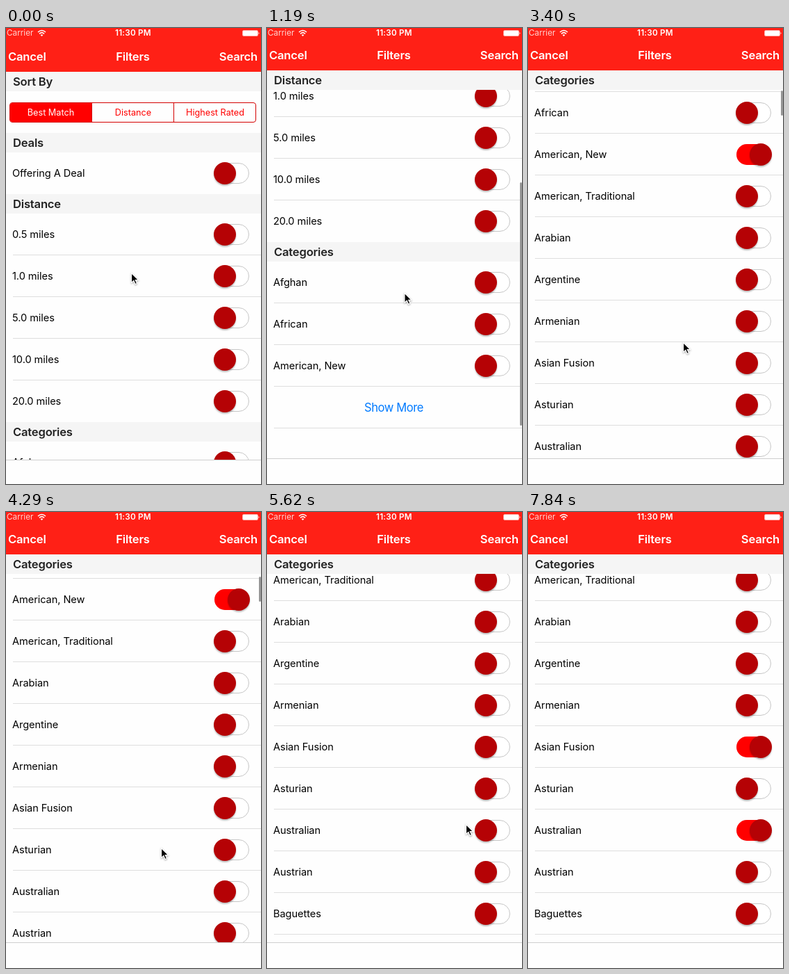
These frames come from a looping animation (367 by 656 pixels, 7990 ms). An HTML page:

```html
<!DOCTYPE html>
<html lang="en">
<head>
<meta charset="utf-8">
<title>Filters</title>
<style>
html, body { margin: 0; width: 100%; height: 100%; overflow: hidden; background: #fefefe; }
body { position: relative; font: 14.6px Inter, "Liberation Sans", sans-serif; color: #000; white-space: nowrap; }
div, span, svg { position: absolute; box-sizing: border-box; }
#nav { left: 0; top: 0; width: 367px; background: #ff2016; color: #fff; }
#status span { top: 0; font-size: 11.75px; line-height: 15px; }
#title { left: 0; width: 367px; height: 26px; font-size: 16.6px; font-weight: 600; line-height: 26px; letter-spacing: -.2px; }
#view { left: 0; width: 367px; height: 558px; overflow: hidden; }
#list { left: 0; top: 0; width: 367px; }
.head { left: 0; width: 367px; height: 28px; padding-left: 10px; background: #f5f5f5; color: #222; font-size: 16.6px; font-weight: 600; line-height: 29px; letter-spacing: -.2px; }
.row { left: 0; width: 367px; height: 60px; padding-left: 9px; line-height: 60px; letter-spacing: -.07px; }
.line::after { content: ""; position: absolute; left: 10px; right: 0; bottom: 0; height: 1px; background: #dedede; }
.more { padding: 0 2px 0 0; text-align: center; color: #007aff; font-size: 16.6px; letter-spacing: -.45px; }
.track, .fill { left: 300px; top: 15px; width: 50px; height: 30px; border-radius: 15px; }
.track { border: 1px solid #c6c6c6; background: #fff; }
.fill { background: #f00; opacity: 0; }
.knob { left: 299px; top: 14px; width: 32px; height: 32px; border-radius: 50%; background: #b50205; box-shadow: 0 2px 2px rgba(0,0,0,.25); }
#seg { left: 5px; top: 44px; width: 355px; height: 29px; border: 1px solid #d40000; border-radius: 4px; overflow: hidden; }
#seg div { top: 0; width: 119px; height: 27px; line-height: 27px; text-align: center; font-size: 12.7px; color: #f00; }
#seg div + div { border-left: 1px solid #d40000; }
#seg .on { background: #f00; color: #fff; }
#bar { left: 364px; width: 3px; border-radius: 1.5px; background: #969696; }
#foot { left: 0; width: 367px; height: 40px; border-top: 1px solid #cfcfcf; background: #fefefe; }
#cursor { left: -1px; top: -1px; filter: drop-shadow(0 1px 1px rgba(0,0,0,.35)); }
</style>
</head>
<body>
<div id="view"><div id="list"></div></div>
<div id="bar"></div>
<div id="foot"></div>
<div id="nav">
  <div id="status">
    <span style="left:1px;color:#ffd2cf">Carrier</span>
    <svg style="left:45px;top:2px" width="13" height="11" fill="none" stroke="#fff" stroke-width="1.6">
      <path d="M1 4Q6.5-1 12 4M3 6.3Q6.5 3 10 6.3"/><path d="M6.5 10L4.6 8Q6.5 6.4 8.4 8Z" fill="#fff" stroke="none"/>
    </svg>
    <span style="left:157px;font-weight:600;letter-spacing:.2px">11:30 PM</span>
    <svg style="left:339px;top:2px" width="27" height="11" fill="#fff">
      <rect x="1.5" y="1.5" width="22" height="8" rx="1.5" fill="none" stroke="#fff" opacity=".6"/>
      <rect x="2" y="2" width="21" height="7" rx="1"/><path d="M24.5 4Q26.5 5.5 24.5 7Z"/>
    </svg>
  </div>
  <div id="title">
    <span style="left:3px">Cancel</span>
    <span style="left:0;width:365px;text-align:center">Filters</span>
    <span style="right:5px">Search</span>
  </div>
</div>
<svg id="cursor" width="15" height="21">
  <path d="M1.5 1.5V15.5L4.8 12.5L7 17.6L9.5 16.5L7.3 11.6H11.6Z" fill="#000" stroke="#fff" stroke-width="1.2"/>
</svg>
<script>
const $ = id => document.getElementById(id);
const LOOP = 7990, STEP = 148, EXPAND = 2500;
const TAPS = { 'American, New': 1600, 'Australian': 6160, 'Asian Fusion': 7640 };

// Pointer moves: start, duration, goal x, goal y.
const MOVES = [
  [150, 590, 194, 378],
  [1150, 350, 325, 482],
  [1640, 430, 194, 534],
  [2500, 900, 223, 452],
  [3600, 690, 223, 483],
  [4292, 700, 220, 453],
  [5200, 420, 286, 449],
  [5650, 270, 322, 452],
  [6230, 130, 310, -30],
  [6530, 130, 300, 92],
  [6660, 300, 250, 180],
  [6960, 700, 322, 337]
];

const ramp = (t, start, time) => Math.max(0, Math.min(1, (t - start) / time));
const smooth = v => v * v * (3 - 2 * v);
const glide = (t, start, time) => 1 - (1 - ramp(t, start, time)) ** 3;

// Flick past the end, bounce back, then two flicks through the longer list.
const scrollAt = t => Math.round(289 * glide(t, 150, 700) - 32 * glide(t, 700, 600)
  + 304 * glide(t, 2650, 750) + 144 * glide(t, 4162, 858));

function pointerAt(t) {
  let x = 180, y = 352;
  for (const [start, time, toX, toY] of MOVES) {
    const p = smooth(ramp(t, start, time));
    x += (toX - x) * p;
    y += (toY - y) * p;
  }
  return [x, y];
}

function add(parent, cls, text = '', top = 0) {
  const el = document.createElement('div');
  el.className = cls;
  el.textContent = text;
  if (top) el.style.top = top + 'px';
  parent.append(el);
  return el;
}

const list = $('list'), heads = [], switches = [], extra = [];
let y = 0;

function section(name) {
  heads.push({ name, y });
  y += 28;
}

function option(name, line) {
  const row = add(list, line ? 'row line' : 'row', name, y);
  add(row, 'track');
  const fill = add(row, 'fill'), knob = add(row, 'knob');
  if (TAPS[name]) switches.push({ fill, knob, tap: TAPS[name] });
  y += 60;
  return row;
}

section('Sort By');
const seg = add(list, '');
seg.id = 'seg';
['Best Match', 'Distance', 'Highest Rated'].forEach((name, i) => {
  add(seg, i ? '' : 'on', name).style.left = i * 118 - 1 + 'px';
});
y += 60;
section('Deals');
option('Offering A Deal');
section('Distance');
['0.5', '1.0', '5.0', '10.0', '20.0'].forEach((d, i) => option(d + ' miles', i < 4));
section('Categories');
['Afghan', 'African', 'American, New'].forEach(n => option(n, true));
const more = add(list, 'row line more', 'Show More', y);
for (const n of ['American, Traditional', 'Arabian', 'Argentine', 'Armenian', 'Asian Fusion', 'Asturian',
  'Australian', 'Austrian', 'Baguettes', 'Bangladeshi']) extra.push(option(n, true));
for (const h of heads) h.el = add(list, 'head', h.name);

function draw(t) {
  const top = t < STEP ? 63 : 61, s = scrollAt(t), open = t >= EXPAND;
  $('nav').style.height = top + 'px';
  $('title').style.top = top - 35 + 'px';
  $('view').style.top = top + 'px';
  $('foot').style.top = top + 558 + 'px';
  list.style.transform = `translateY(${-s}px)`;

  // Section heads stick to the top until the next one pushes them out.
  heads.forEach((h, i) => {
    const next = heads[i + 1];
    const stuck = next ? Math.min(s, next.y - 28) : s;
    h.el.style.top = Math.max(h.y, stuck) + 'px';
  });

  more.style.display = open ? 'none' : '';
  for (const row of extra) row.style.display = open ? '' : 'none';
  for (const w of switches) {
    const p = smooth(ramp(t, w.tap, 200));
    w.fill.style.opacity = p;
    w.knob.style.left = 299 + 20 * p + 'px';
  }

  const bar = $('bar').style, barTop = open ? 62 + s * .05 : 61 + s * .628;
  bar.top = barTop + 'px';
  bar.height = (open ? 36 : Math.min(350, 573 - barTop)) + 'px';
  bar.opacity = open
    ? ramp(t, 2600, 100) * (1 - ramp(t, 5250, 300))
    : ramp(t, 100, 40) * (1 - ramp(t, 1500, 300));

  const [px, py] = pointerAt(t);
  $('cursor').style.transform = `translate(${px}px, ${py}px)`;
  $('cursor').style.display = t < 7800 ? '' : 'none';
}

// The screen refreshes in steps of about a seventh of a second.
function tick() {
  const t = performance.now() % LOOP;
  draw(Math.min(53, Math.floor((t + 8) / STEP)) * STEP);
  requestAnimationFrame(tick);
}
tick();
</script>
</body>
</html>
```
